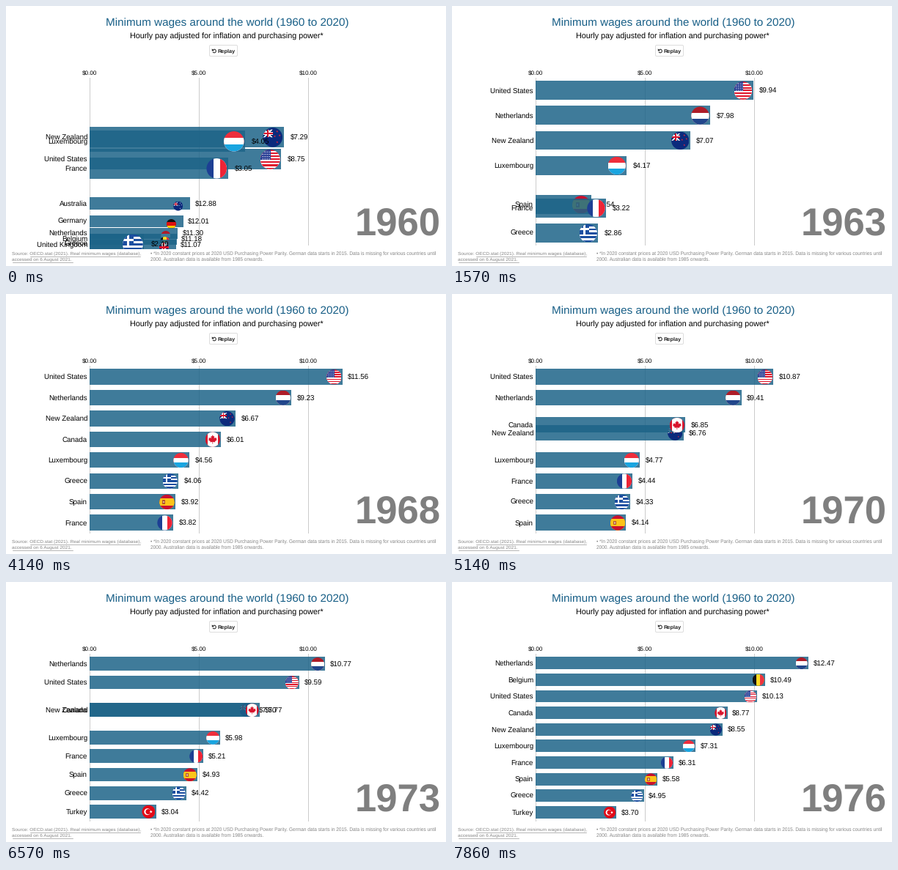
Animation of 600 by 355 pixels, one loop 8000 ms. Source, as a matplotlib script:

```python
import numpy as np
import matplotlib.pyplot as plt
from matplotlib.animation import FuncAnimation
from matplotlib.patches import Arc, Circle, FancyBboxPatch, Polygon, Rectangle
from matplotlib.path import Path
from matplotlib.transforms import Affine2D

W, H = 600, 355
FRAMES, INTERVAL = 160, 50
RATE = 7                         # visible steps per second
PX = 0.72                        # points per pixel at 100 dpi
X0, UNIT = 114, 29.83            # bar start, pixels per dollar
TOP, SPAN, BELOW = 102.3, 220.5, 341
MOVE, INTRO = 0.5, 0.2           # seconds per reorder, length of the opening move

plt.rcParams.update({"font.family": "Liberation Sans", "text.hinting": "none"})
fig = plt.figure(figsize=(6, 3.55), dpi=100, facecolor="white")
ax = fig.add_axes([0, 0, 1, 1])
ax.set(xlim=(0, W), ylim=(H, 0))
ax.axis("off")

NAVY, RED, WHITE = "#012169", "#d8152d", "white"


def write(x, y, s, size, **kw):
    return ax.text(x, y, s, fontsize=size * PX, va="baseline", **kw)


# ---- flags, drawn in a unit circle with y pointing down ----

def box(x, y, w, h, color):
    return Rectangle((x, y), w, h, fc=color)


def dot(x, y, r, color):
    return Circle((x, y), r, fc=color)


def poly(points, color):
    return Polygon(points, closed=True, fc=color)


def star(x, y, r, color):
    a = np.arange(10) * np.pi / 5 - np.pi / 2
    k = np.where(np.arange(10) % 2, 0.42, 1) * r
    return poly(np.c_[x + k * np.cos(a), y + k * np.sin(a)], color)


def rows(*colors):
    n = len(colors)
    return [box(-1, -1 + 2 * i / n, 2, 2 - 2 * i / n, c) for i, c in enumerate(colors)]


def cols(*colors):
    n = len(colors)
    return [box(-1 + 2 * i / n, -1, 2 - 2 * i / n, 2, c) for i, c in enumerate(colors)]


def union(x, y, w, h):
    d, b, c = 0.2 * w, 0.3 * h, 0.16 * h
    r, m, e, n = x + w, y + h / 2, y + h, x + w / 2
    return [box(x, y, w, h, NAVY),
            poly([(x, y), (x + d, y), (r, e), (r - d, e)], WHITE),
            poly([(r, y), (r - d, y), (x, e), (x + d, e)], WHITE),
            box(x, m - b / 2, w, b, WHITE), box(n - b / 2, y, b, h, WHITE),
            box(x, m - c / 2, w, c, RED), box(n - c / 2, y, c, h, RED)]


def southern(color):
    spots = [(0.45, -0.6), (0.2, -0.1), (0.7, -0.2), (0.45, 0.5)]
    return ([box(-1, -1, 2, 2, "#0b2a7c")] + union(-1, -0.8, 1, 0.8)
            + [star(x, y, 0.12, color) for x, y in spots])


def usa():
    stars = [dot(-0.75 + 0.22 * i, -0.75 + 0.24 * j, 0.05, WHITE)
             for i in range(4) for j in range(4)]
    return rows(*["#e0162b", WHITE] * 6, "#e0162b") + [box(-1, -1, 1.05, 1.08, "#2a3f95")] + stars


def canada():
    half = np.array([(0, -1), (.18, -.65), (.38, -.75), (.3, -.2), (.55, -.45), (.62, -.3),
                     (.9, -.35), (.8, -.05), (.95, .08), (.5, .42), (.55, .6), (.06, .52),
                     (.06, .95)])
    leaf = np.vstack([half, half[::-1] * (-1, 1)]) * 0.62
    return [box(-1, -1, 2, 2, RED), box(-0.7, -1, 1.4, 2, WHITE), poly(leaf, RED)]


def greece():
    blue = "#1c4fa0"
    return rows(*[blue, WHITE] * 4, blue) + [
        box(-1, -1, 1.11, 1.11, blue), box(-1, -0.56, 1.11, 0.22, WHITE),
        box(-0.56, -1, 0.22, 1.11, WHITE)]


def spain():
    red, gold = "#c8102e", "#fcc419"
    return rows(red, gold, gold, red) + [box(-0.62, -0.28, 0.42, 0.55, "#b5562a"),
                                         box(-0.5, -0.14, 0.18, 0.28, "#dcae96")]


def turkey():
    red = "#e30a17"
    return [box(-1, -1, 2, 2, red), dot(-0.18, 0, 0.5, WHITE), dot(-0.05, 0, 0.4, red),
            star(0.36, 0, 0.25, WHITE)]


FLAGS = {
    "US": usa, "CA": canada, "GR": greece, "ES": spain, "TR": turkey,
    "NL": lambda: rows("#ae1c28", WHITE, "#21468b"),
    "LU": lambda: rows("#ee2e3c", WHITE, "#19a5e0"),
    "FR": lambda: cols("#1d3f94", WHITE, "#ee2436"),
    "BE": lambda: cols("#111111", "#fdda24", "#ef3340"),
    "DE": lambda: rows("#111111", "#dd1111", "#ffce00"),
    "NZ": lambda: southern("#e0243a"),
    "AU": lambda: southern(WHITE),
    "UK": lambda: union(-1, -1, 2, 2),
}


class Bar:
    def __init__(self, code, name, z):
        self.rect = ax.add_patch(Rectangle((X0, 0), 1, 1, fc="#1d6488", lw=0,
                                           alpha=0.85, zorder=z))
        self.place = Affine2D()
        trans = self.place + ax.transData
        self.flag = FLAGS[code]()
        for p in self.flag:
            p.set(lw=0, transform=trans, zorder=z + 0.2)
            ax.add_patch(p)
            p.set_clip_path(Path.unit_circle(), trans)
        self.name = write(111, 0, name, 9.8, ha="right", zorder=z + 0.4)
        self.tag = write(0, 0, "", 9.8, zorder=z + 0.4)
        self.parts = [self.rect, self.name, self.tag, *self.flag]

    def hide(self):
        for p in self.parts:
            p.set_visible(False)

    def show(self, y, h, length, label, flag=None):
        for p in self.parts:
            p.set_visible(True)
        end = X0 + length * UNIT
        self.rect.set(y=y - h / 2, height=h, width=end - X0)
        dx, dy, r = flag or (h / 2 + 0.8, 0.3, 0.475 * h)
        self.place.clear().scale(r).translate(end - dx, y + dy)
        self.name.set_y(y + 3.3)
        self.tag.set(x=end + 2.8 + 0.22 * h, y=y + 3.5, text=f"${label:.2f}")


# ---- data: values at the key times, aligned to the last one, plus one extra point ----

KEYS = [0, 1.571, 2.857, 4.143, 5.143, 6.571, 7.857]
DATA = {
    "ES": ("Spain", [2.77, 3.92, 4.14, 4.93, 5.58], (1.71, 3.48)),
    "US": ("United States", [8.75, 9.94, 10.21, 11.56, 10.87, 9.59, 10.13], None),
    "NL": ("Netherlands", [7.98, 8.73, 9.23, 9.41, 10.77, 12.47], None),
    "NZ": ("New Zealand", [7.29, 7.07, 6.98, 6.67, 6.76, 7.50, 8.55], (6.8, 8.05)),
    "CA": ("Canada", [5.80, 6.01, 6.85, 7.77, 8.77], None),
    "LU": ("Luxembourg", [4.05, 4.17, 4.41, 4.56, 4.77, 5.98, 7.31], None),
    "FR": ("France", [3.05, 3.22, 3.18, 3.82, 4.44, 5.21, 6.31], None),
    "GR": ("Greece", [2.49, 2.86, 3.15, 4.06, 4.33, 4.42, 4.95], None),
    "TR": ("Turkey", [3.04, 3.70], None),
    "BE": ("Belgium", [10.49], None),
}
RANKS = [(t, s.split()) for t, s in [
    (0, "US NZ LU FR GR"),
    (0.71, "US NL NZ LU FR GR"),
    (1.206, "US NL NZ LU ES FR GR"),
    (1.79, "US NL NZ LU FR ES GR"),
    (2.29, "US NL NZ CA LU FR GR ES"),
    (2.77, "US NL NZ CA LU GR FR ES"),
    (3.29, "US NL NZ CA LU GR ES FR"),
    (4.29, "US NL NZ CA LU FR GR ES"),
    (4.80, "US NL CA NZ LU FR GR ES"),
    (5.29, "US NL CA NZ LU FR ES GR"),
    (5.79, "NL US CA NZ LU FR ES GR TR"),
    (6.32, "NL US NZ CA LU FR ES GR TR"),
    (7.29, "NL BE US CA NZ LU FR ES GR TR"),
]]
# opening place: centre, height, extra dollars
START = {"US": (209, 28, 0), "NZ": (179, 28, 1.58), "LU": (184.5, 29, 3.06),
         "FR": (221.5, 29, 3.27), "GR": (325, 29, 0)}
LEAVING = [("AU", "Australia", 12.88, 269.5, 17), ("DE", "Germany", 12.01, 294, 16),
           ("NL", "Netherlands", 11.30, 310, 15), ("BE", "Belgium", 11.18, 318, 15),
           ("UK", "United Kingdom", 11.07, 326, 15)]


def series(values, extra):
    points = list(zip(KEYS[-len(values):], values)) + ([extra] if extra else [])
    return np.array(sorted(points)).T


def slots(order):
    pitch = SPAN / (len(order) - 0.25)
    h = 0.75 * pitch
    return {c: (TOP + h / 2 + i * pitch, h) for i, c in enumerate(order)}, h


def mix(a, b, k):
    return a + (b - a) * k


SERIES = {c: series(v, e) for c, (_, v, e) in DATA.items()}
leavers = [Bar(code, name, 3 + i) for i, (code, name, *_) in enumerate(LEAVING)]
bars = {c: Bar(c, d[0], 10 + i) for i, (c, d) in enumerate(DATA.items())}

# ---- fixed parts ----

write(301.5, 27, "Minimum wages around the world (1960 to 2020)", 15.3, ha="center", color="#185f87")
write(301, 45, "Hourly pay adjusted for inflation and purchasing power*", 10.77, ha="center")
ax.add_patch(FancyBboxPatch((278, 54), 37, 14, boxstyle="round,pad=0.5,rounding_size=1.5",
                            fc="white", ec="#dddddd", lw=PX))
ax.add_patch(Arc((284, 61.5), 4.6, 4.6, theta1=-130, theta2=150, ec="#222222", lw=PX))
ax.add_patch(poly([(280.8, 58.2), (280.8, 61.4), (284, 61.2)], "#222222"))
write(288.5, 64, "Replay", 7.4, weight="bold", color="#222222")
for usd in (0, 5, 10):
    x = X0 + usd * UNIT
    ax.plot([x, x], [98, 326], color="#cccccc", lw=PX, zorder=1)
    write(x, 94, f"${usd:.2f}", 8.2, ha="center")

ax.add_patch(Rectangle((0, 332), W, H - 332, fc="white", lw=0, zorder=30))
GREY = dict(color="#868686", zorder=31)
write(8.5, 340, "Source: OECD.stat (2021). Real minimum wages (database),", 6.45, **GREY)
write(8.5, 348, "accessed on 6 August 2021.", 6.45, **GREY)
for xa, xb, y in ((33, 183, 341.5), (8.5, 91, 349.5)):
    ax.plot([xa, xb], [y, y], lw=0.6 * PX, **GREY)
write(197, 340, "• *In 2020 constant prices at 2020 USD Purchasing Power Parity. German data "
      "starts in 2015. Data is missing for various countries until", 6.57, **GREY)
write(197, 348, "2000. Australian data is available from 1985 onwards.", 6.57, **GREY)
year = write(593, 312, "1960", 52.6, ha="right", weight="bold", color="#7f7f7f", zorder=2)


def update(frame):
    # the picture holds still between steps
    t = int((frame + 0.9) * INTERVAL * RATE / 1000) / RATE
    year.set_text(str(int(1960 + 2 * t + 0.42)))

    left = max(0, 1 - t / INTRO)
    for bar, (_, _, value, y, h) in zip(leavers, LEAVING):
        if left:
            bar.show(mix(BELOW + 6, y, left), h, value * 0.357 * left, value,
                     flag=(16.5, 3.5, 6.5 * left))
        else:
            bar.hide()

    now = max(i for i, (start, _) in enumerate(RANKS) if start <= t)
    start, order = RANKS[now]
    goal, _ = slots(order)
    if now:
        k = min(1, (t - start) / MOVE)
        before, h_before = slots(RANKS[now - 1][1])
    else:
        k = 1 - left
        before, h_before = {c: p[:2] for c, p in START.items()}, 0
    for code, bar in bars.items():
        if code not in goal:
            bar.hide()
            continue
        grow = 1 if code in before else k
        y, h = mix(np.array(before.get(code, (BELOW, h_before))), np.array(goal[code]), k)
        value = np.interp(t, *SERIES[code]) * grow
        extra = START[code][2] * left if code in START else 0
        bar.show(y, h, value + extra, value)
    return []


anim = FuncAnimation(fig, update, frames=FRAMES, interval=INTERVAL,
                     init_func=lambda: update(0), repeat=True, blit=False)
plt.show()
```
